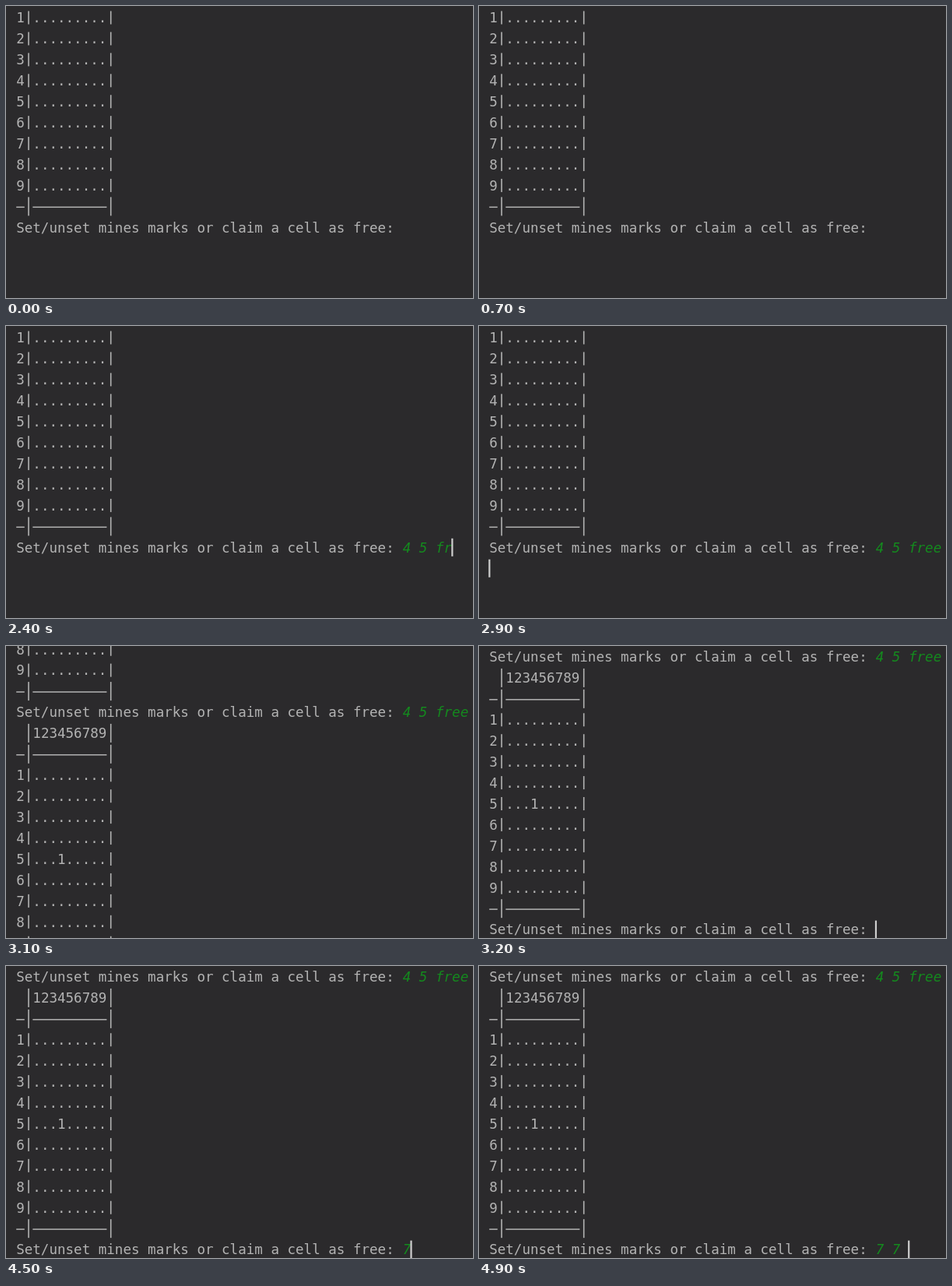
These frames come from a looping animation (600 px wide and 375 px high, 5 s). An HTML page with a canvas:

```html
<!DOCTYPE html>
<html lang="en">
<head>
<meta charset="utf-8">
<title>Minesweeper in a terminal</title>
<style>
  html, body { margin: 0; width: 100%; height: 100%; overflow: hidden; background: #2b2a2c; }
  canvas { display: block; }
</style>
</head>
<body>
<canvas id="screen" width="600" height="375"></canvas>
<script>
const ctx = document.getElementById('screen').getContext('2d');
const LOOP = 5000, LEFT = 13.2, CELL = 10.565, PITCH = 26.93, TOP = 15;
const FONT = '17.55px "DejaVu Sans Mono", monospace';
const GREY = '#b3b3b3', GREEN = '#148a1e';
const PROMPT = 'Set/unset mines marks or claim a cell as free: ';

// Each entry: time of the key press, text typed so far
const FIRST = [[0, ''], [1200, '4'], [1300, '4 '], [1500, '4 5'], [1700, '4 5 '],
  [2300, '4 5 f'], [2400, '4 5 fr'], [2600, '4 5 fre'], [2800, '4 5 free']];
const SECOND = [[0, ''], [4400, '7'], [4600, '7 '], [4700, '7 7'], [4900, '7 7 ']];
const SCROLL = [[0, 0], [3100, 199.3], [3200, 270.3]];
const CARET = [[0, false], [100, true], [600, false], [1100, true], [2200, false],
  [2300, true], [3600, false], [4100, true]];

const at = (steps, t) => steps.filter(([start]) => start <= t).pop()[1];
const colX = col => LEFT + col * CELL;
const lineY = line => TOP + line * PITCH;

function text(str, col, line, color = GREY, style = '') {
  ctx.font = style + FONT;
  ctx.fillStyle = color;
  ctx.fillText(str, colX(col), lineY(line) + 6.3);
}

function rect(x, y, w, h, color = GREY) {
  ctx.fillStyle = color;
  ctx.fillRect(x, y, w, h);
}

function bars(line, height) {
  for (const col of [1.5, 11.5]) rect(colX(col) - 0.8, lineY(line) - height / 2, 1.6, height);
}

function rule(line) {
  bars(line, 24);
  rect(colX(0), lineY(line) + 0.2, CELL, 1.5);
  rect(colX(2), lineY(line) + 0.2, CELL * 9, 1.5);
}

function board(line, opened) {
  for (let row = 1; row <= 9; row++, line++) {
    text(String(row), 0, line);
    text(row === opened ? '...1.....' : '.........', 2, line);
    bars(line, 17);
  }
  rule(line);
}

function prompt(line, input) {
  text(PROMPT, 0, line);
  text(input, PROMPT.length, line, GREEN, 'italic ');
}

function caret(col, line) {
  rect(colX(col) - 0.9, lineY(line) - 11.5, 2.2, 23, '#cfcfcf');
}

function draw(t) {
  const first = at(FIRST, t), second = at(SECOND, t);
  rect(0, 0, 600, 375, '#2b2a2c');
  ctx.save();
  ctx.translate(0, -at(SCROLL, t));
  board(0);
  prompt(10, first);
  if (t >= 3100) {
    text('123456789', 2, 11);
    bars(11, 24);
    rule(12);
    board(13, 5);
    prompt(23, second);
  }
  if (at(CARET, t)) {
    if (t < 2900) caret(PROMPT.length + first.length, 10);
    else if (t < 3100) caret(0, 11);
    else caret(PROMPT.length + second.length, 23);
  }
  ctx.restore();
}

function tick() {
  draw(performance.now() % LOOP);
  requestAnimationFrame(tick);
}
tick();
</script>
</body>
</html>
```
